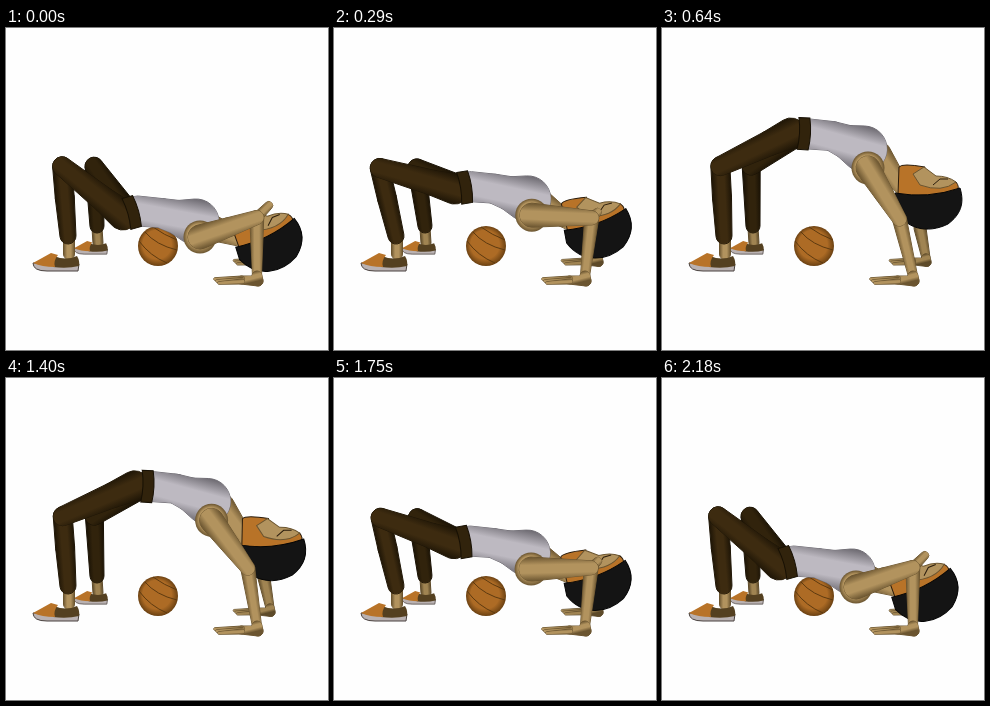
These frames come from a looping animation (322 px wide and 322 px high, 2.38 s). An HTML page with a canvas:

```html
<!DOCTYPE html>
<html lang="en">
<head>
<meta charset="utf-8">
<title>Bridge exercise</title>
<style>
html, body { margin: 0; width: 100%; height: 100%; overflow: hidden; background: #fefefe; }
canvas { display: block; }
</style>
</head>
<body>
<canvas id="stage" width="322" height="322"></canvas>
<script>
const ctx = document.getElementById('stage').getContext('2d');
const LOOP = 2380, STEP = 70, RISE = 150, FALL = 1400;

// [edge, body] colour pairs
const PANTS = ['#1e1506', '#3d2b10'], FAR_PANTS = ['#171004', '#31230c'];
const SKIN = ['#6b5530', '#b2935e'], FAR_SKIN = ['#5d4a29', '#a08452'];
const SHIRT = ['#6d6a71', '#bdb9c1'];
const ORANGE = '#b87328', BROWN = '#544020', OUTLINE = '#2a1c0c';

const ANKLE = [62, 208], WRIST = [251, 248];

const smooth = u => u * u * (3 - 2 * u);
const mix = (a, b, k) => a.map((v, i) => v + (b[i] - v) * k);
const add = ([x, y], dx, dy) => [x + dx, y + dy];

// 0 lying, 1 full bridge; the pose moves in even steps
function liftAt(t) {
  const steps = start => Math.max(0, Math.floor((t - start) / STEP) + 1);
  return smooth(Math.min(1, steps(RISE) / 8)) - smooth(Math.min(1, steps(FALL) / 9));
}

// Two-bone joint between a planted end and a moving root
function bend(end, root, lower, upper, side) {
  const dx = root[0] - end[0], dy = root[1] - end[1], d = Math.hypot(dx, dy);
  const along = (lower * lower - upper * upper + d * d) / (2 * d);
  const out = side * Math.sqrt(Math.max(0, lower * lower - along * along));
  return add(end, (dx * along - dy * out) / d, (dy * along + dx * out) / d);
}

// Rounded, tapered chain of [point, radius] nodes shaded across its axis
function limb([edge, body], ...nodes) {
  const path = new Path2D();
  for (let i = 1; i < nodes.length; i++) {
    const [[x, y], r] = nodes[i - 1], [[u, v], s] = nodes[i];
    const a = Math.atan2(v - y, u - x);
    const off = Math.acos(Math.max(-1, Math.min(1, (r - s) / (Math.hypot(u - x, v - y) || 1))));
    path.moveTo(x + r * Math.cos(a + off), y + r * Math.sin(a + off));
    path.arc(x, y, r, a + off, a - off + 2 * Math.PI);
    path.arc(u, v, s, a - off, a + off);
    path.closePath();
  }
  const first = nodes[0][0], last = nodes[nodes.length - 1][0];
  const [cx, cy] = mix(first, last, 0.6);
  const a = Math.atan2(last[1] - first[1], last[0] - first[0]);
  const r = Math.max(...nodes.map(n => n[1]));
  const dx = -Math.sin(a) * r, dy = Math.cos(a) * r;
  const shade = ctx.createLinearGradient(cx - dx, cy - dy, cx + dx, cy + dy);
  [edge, body, body, edge].forEach((c, i) => shade.addColorStop(i / 3, c));
  ctx.strokeStyle = edge;
  ctx.lineWidth = 1;
  ctx.stroke(path);
  ctx.fillStyle = shade;
  ctx.fill(path);
}

function ball([x, y], r, light, dark) {
  const shade = ctx.createRadialGradient(x - r * 0.15, y - r * 0.2, r * 0.2, x, y, r);
  shade.addColorStop(0, light);
  shade.addColorStop(0.65, light);
  shade.addColorStop(1, dark);
  ctx.fillStyle = shade;
  ctx.beginPath();
  ctx.arc(x, y, r, 0, 2 * Math.PI);
  ctx.fill();
}

function shape(fill, d, stroke) {
  const path = new Path2D(d);
  if (fill) {
    ctx.fillStyle = fill;
    ctx.fill(path);
  }
  if (stroke) {
    ctx.strokeStyle = stroke;
    ctx.lineWidth = 1;
    ctx.stroke(path);
  }
}

function placed([x, y], scale, angle, draw) {
  ctx.save();
  ctx.translate(x, y);
  ctx.rotate(angle);
  ctx.scale(scale, scale);
  draw();
  ctx.restore();
}

function shoe() {
  shape('#b9b1b1', 'M0 10 Q0 18 14 18 L45 18 L46 11 Z', '#4b4340');
  shape(BROWN, 'M21 3 Q33 8 44 3 Q47 8 46 13 Q34 16 20 14 Z');
  shape(ORANGE, 'M0 10 L18 0 L25 2 Q20 8 22 14 Q9 14 0 10 Z');
}

function hand(colours) {
  limb(colours, [[0, 0], 5], [[1, 5], 5], [[-16, 4], 4]);
  for (let i = 0; i < 3; i++)
    limb(colours, [[-15, 2.5 + i * 1.5], 2.5], [[-42 + i * 2, 3 + i * 2], 1.3]);
}

function head() {
  shape(ORANGE, 'M-29 -25 Q-26 -29 -3 -25 L-8 -10 L28 -10 Q32 -5 29 -1 Q4 8 -30 3 Z', OUTLINE);
  shape(SKIN[1], 'M-15 -18 L-4 -25 L8 -16 Q20 -16 28 -10 Q14 1 -8 -7 Z', SKIN[0]);
  shape(null, 'M5 -7 L12 -13 L20 -13', OUTLINE);
  shape('#141414', 'M-33 1 Q0 7 32 -4 C37 12 32 23 20 32 C0 42 -24 38 -34 14 Z', '#050505');
}

function draw(lift) {
  const between = (low, high) => mix(low, high, lift);
  const hip = between([117, 187], [129, 105]);
  const waist = between([131, 183], [147, 106]);
  const belly = between([155, 185], [170, 108]);
  const chest = between([190, 194], [202, 121]);
  const shoulder = between([194, 209], [206, 140]);
  const skull = between([260, 206], [266, 164]);
  const knee = bend(ANKLE, hip, 70, 78, -1);
  const elbow = bend(WRIST, shoulder, 58.5, 60, 1);
  const farKnee = [60 + knee[0] / 2, knee[1]];
  const fold = (1 - lift) ** 2;

  ctx.fillStyle = '#fefefe';
  ctx.fillRect(0, 0, 322, 322);

  // Far side
  limb(FAR_SKIN, [[91, 200], 5], [[92, 215], 5]);
  placed([68, 213], 0.73, 0, shoe);
  limb(FAR_PANTS, [farKnee, 9], [[91, 198], 7]);
  limb(FAR_PANTS, [farKnee, 9], [mix(hip, waist, 0.3), 13]);
  limb(FAR_SKIN, [[258, 200], 6], [[264, 230], 4]);
  placed([264, 230], 0.85, 0, () => hand(FAR_SKIN));

  ball([152, 218], 20, '#ad6b25', '#6b4112');
  shape(null, 'M139 204 Q150 217 171 222 M147 199 Q158 207 171 212 M133 213 Q144 228 161 235', '#5d3a10');

  // Neck, head and torso
  limb(SKIN, [add(chest, 14, 5), 13], [add(skull, -27, 4 - 10 * lift), 8]);
  placed(skull, 1, -0.38 * (1 - lift), head);
  limb(SHIRT, [waist, 15], [belly, 14.5], [mix(belly, chest, 0.5), 17], [chest, 23]);

  // Near leg
  limb(SKIN, [[63, 210], 5.5], [[63, 226], 5.5]);
  placed([27, 225], 1, 0, shoe);
  limb(PANTS, [knee, 9.5], [mix(knee, ANKLE, 0.45), 9.5], [ANKLE, 8]);
  limb(PANTS, [knee, 9.5], [mix(knee, hip, 0.7), 12.5], [hip, 15]);
  placed(waist, 1, Math.atan2(waist[1] - hip[1], waist[0] - hip[0]), () =>
    shape(FAR_PANTS[1], 'M-11 -16 L0 -16 Q3 0 0 16 L-11 16 Q-8 0 -11 -16 Z', FAR_PANTS[0]));

  // Near arm
  limb(SKIN, [elbow, 5], [add(elbow, 12 * fold, -12 * fold), 4]);
  limb(SKIN, [elbow, 7], [WRIST, 4.5]);
  placed(WRIST, 1, 0, () => hand(SKIN));
  ball(shoulder, 16.5, SKIN[1], SKIN[0]);
  limb(SKIN, [shoulder, 12], [mix(shoulder, elbow, 0.5), 9.5], [elbow, 7]);
}

const begin = performance.now();
function frame() {
  draw(liftAt((performance.now() - begin) % LOOP));
  requestAnimationFrame(frame);
}
frame();
</script>
</body>
</html>
```
